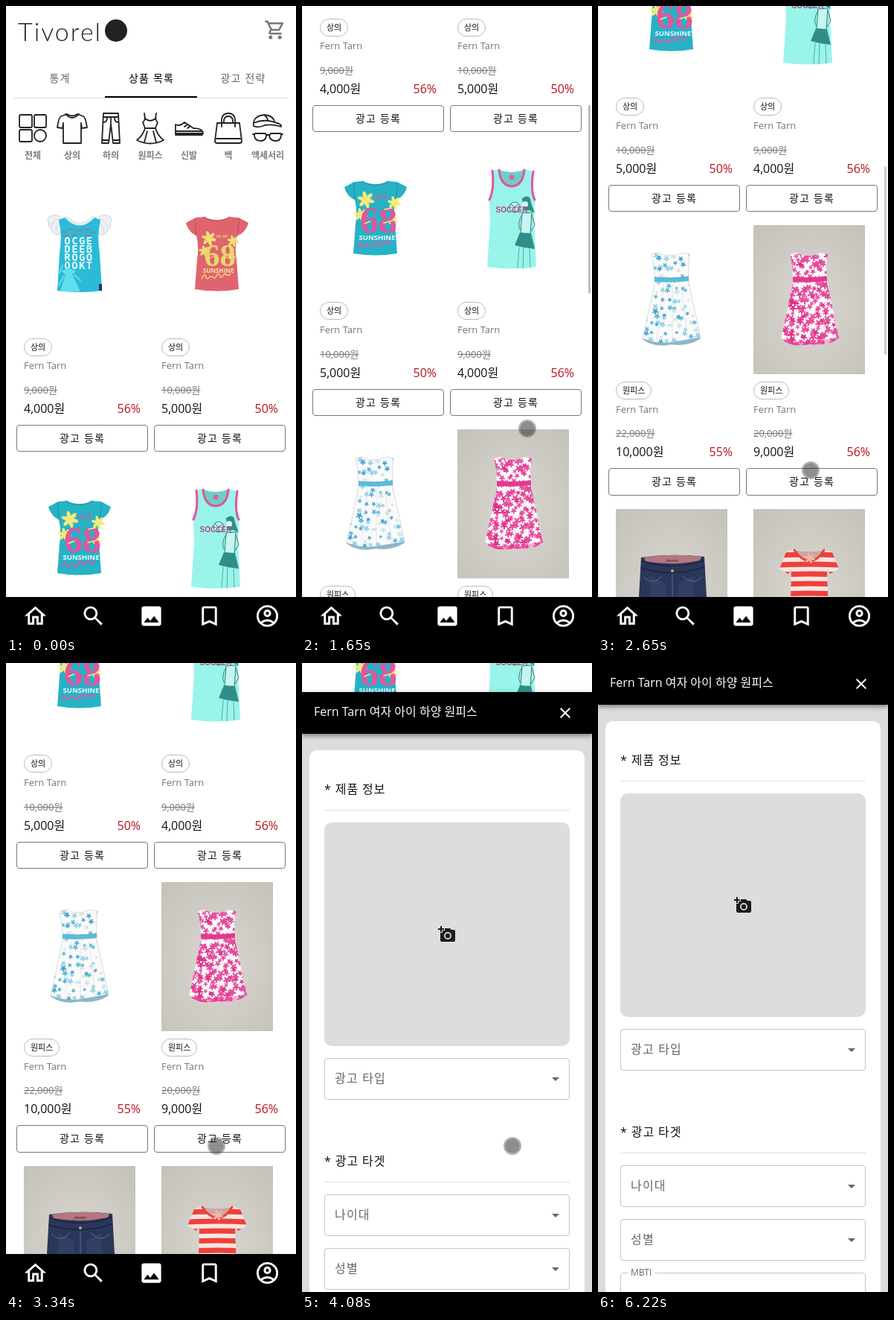
An HTML page for the animation above (8000 ms loop, 390 by 844 pixels).

```html
<!DOCTYPE html>
<html lang="ko">
<head>
<meta charset="utf-8">
<title>상품 목록</title>
<style>
html, body { margin: 0; width: 100%; height: 100%; overflow: hidden; background: #fff; }
body { font: 16px/20px "Open Sans", "Noto Sans CJK KR", "Noto Sans CJK", sans-serif; color: #111; }
div, svg { position: absolute; box-sizing: border-box; }
svg { overflow: visible; }
#stage { left: 0; top: 0; width: 390px; height: 844px; overflow: hidden; }
#page { left: 0; top: 0; width: 390px; height: 1800px; }
.t { white-space: nowrap; line-height: 20px; margin-top: -10px; }
.mid { transform: translateX(-50%); }
.logo { font: 300 34px/20px Lato, "Open Sans", sans-serif; letter-spacing: 2px; color: #222; }
.tab { font-size: 14px; letter-spacing: 1.2px; color: #666; }
.on { color: #000; }
.cat { font-size: 12px; font-weight: 700; color: #7c7c7c; }
.tag { left: 10px; top: 209.8px; height: 24px; padding: 0 8px; border: 1px solid #bbb; border-radius: 12px; font-size: 11px; line-height: 21px; white-space: nowrap; }
.name { font-size: 13px; color: #777; }
.old { font-size: 13px; color: #777; text-decoration: line-through; }
.off { right: 10px; color: #b8101c; }
.btn { left: 0; top: 326px; width: 177px; height: 36.5px; border: 1px solid #777; border-radius: 4px; text-align: center; font-size: 14px; line-height: 33px; letter-spacing: 1.2px; }
.card { width: 177px; height: 380px; }
.pic { left: 10px; top: 0; width: 150px; height: 200px; }
#nav { left: 0; top: 793px; width: 390px; height: 51px; background: #000; }
#bar { left: 385px; top: 4px; width: 3px; height: 253px; border-radius: 2px; background: #bdbdbd; }
#modal { left: 0; top: 0; width: 390px; height: 844px; background: #dcdcde; }
.head { left: 0; top: 0; width: 390px; height: 56px; background: #000; color: #fff; box-shadow: 0 2px 4px -1px #0003, 0 4px 5px #0003, 0 1px 10px #0002; }
.title { font-weight: 500; }
.sheet { left: 10px; top: 78px; width: 370px; height: 900px; border-radius: 10px; background: #fff; }
.photo { left: 30px; width: 330px; height: 300px; border-radius: 10px; background: #ddd; }
.rule { left: 30px; width: 330px; height: 1px; background: #e0e0e0; }
.field { left: 30px; width: 330px; height: 56px; border: 1px solid #c4c4c4; border-radius: 4px; }
.sec { letter-spacing: .9px; }
.lab { letter-spacing: 1.2px; color: #666; }
.notch { padding: 0 4px; font-size: 12px; color: #666; background: #fff; }
#dot { left: -12px; top: -12px; width: 24px; height: 24px; border-radius: 50%; border: 2px solid rgba(90,80,80,.45); background-clip: padding-box; }
</style>
</head>
<body>
<div id="stage">
  <div id="page"></div>
  <div id="bar"></div>
  <div id="nav"></div>
  <div id="modal"></div>
  <div id="dot"></div>
</div>
<script>
const $ = id => document.getElementById(id);
const text = (x, y, s, cls = '') => `<div class="t ${cls}" style="left:${x}px;top:${y}px">${s}</div>`;
const box = (cls, y) => `<div class="${cls}" style="top:${y}px"></div>`;
const icon = (cx, cy, size, color, d) =>
  `<svg viewBox="0 0 24 24" width="${size}" height="${size}" style="left:${cx - size / 2}px;top:${cy - size / 2}px" fill="${color}">${d}</svg>`;
const path = (d, attrs = '') => `<path d="${d}" ${attrs}/>`;
const line = (d, color, w = 1) => path(d, `fill="none" stroke="${color}" stroke-width="${w}" stroke-linecap="round" stroke-linejoin="round"`);
const disc = (x, y, r, attrs = '') => `<circle cx="${x}" cy="${y}" r="${r}" ${attrs}/>`;
const word = (x, y, size, color, s, attrs = '') =>
  `<text x="${x}" y="${y}" font-size="${size}" fill="${color}" font-weight="700" text-anchor="middle" ${attrs}>${s}</text>`;

let seed = 90210;
const rnd = () => (seed = (seed * 16807) % 2147483647) / 2147483647;

/* ---- clothes, each drawn in a 150 x 200 box ---- */
const backdrop = '<rect width="150" height="200" fill="url(#wall)"/>';
const script = (y, color) => line(`M51 ${y + 2}q4 -9 6 -3t5 2t6 -1t5 0q4 -9 6 -3t5 1t6 -2t6 -1`, color, 1.8);
const bloom = (x, y, s, color, petals = 6) => {
  let out = '';
  for (let i = 0; i < petals; i++) out += `<ellipse cx="6" rx="7" ry="3" transform="rotate(${i * 360 / petals + 15})"/>`;
  return `<g transform="translate(${x.toFixed(1)} ${y.toFixed(1)}) scale(${s.toFixed(2)})" fill="${color}">${out}</g>`;
};

function ruffleTee() {
  const sleeve = path('M48 46Q40 43 34 47Q30 50 34 55Q32 60 37 63Q38 70 44 71Q49 72 50 66Z', 'fill="#eef1f4" stroke="#c8d0d8"') +
    line('M46 50Q40 52 37 60M48 54Q43 60 43 68', '#cfd6de');
  const rows = ['OCGE', 'DEEB', 'ROGO', 'OOKT'].map((s, i) =>
    word(74, 84 + i * 11, 14, '#e4fbfe', s, 'font-family="DejaVu Sans Mono, monospace" letter-spacing="1.4"')).join('');
  return sleeve + `<g transform="matrix(-1 0 0 1 150 0)">${sleeve}</g>` +
    path('M57 47Q75 64 93 47L103 51Q98 72 102 96L105 146Q75 150 45 146L48 96Q52 72 47 51Z', 'fill="#2bbad7"') +
    line('M57 47Q75 66 93 47', '#e6ebef', 4) +
    line('M52 67h5m3 -3h7m4 1h8m3 -1h7m3 4h4M54 73h6m5 -1h5m13 0h6', '#8d7f96', 2) + rows +
    path('M49 147L56 124L50 120L60 115L70 120L65 124L76 147Z', 'fill="#62deee"') +
    line('M54 126L47 138M68 125L76 132M52 112L48 122', '#62deee', 2) +
    '<rect x="101" y="137" width="4" height="9" fill="#1c3d4c"/>';
}

function printTee(body, shade, num, accent, white, k) {
  return path('M57 47Q75 55 92 47L104 48L117 55Q115 64 107 70L102 72Q98 88 101 104L104 144Q75 149 45 144L48 104Q51 88 47 72L43 70Q35 64 33 55L46 48Z', `fill="${body}"`) +
    line('M57 47Q75 58 92 47M47 72L45 50M102 72L105 50', shade, 1.2) +
    `<g transform="translate(${75 - 75 * k} ${98 - 98 * k}) scale(${k})">` +
    bloom(62, 72, .9, accent) + bloom(55, 92, .7, accent) + bloom(100, 76, .7, accent) + bloom(98, 100, .5, accent) +
    word(82, 71, 8, num, '68 68', 'font-family="Liberation Serif, serif" font-style="italic"') +
    word(79, 116, 50, num, '68', 'font-family="Liberation Serif, serif"') +
    line('M60 104l8 -3m18 2l12 -3m-11 -15l10 -2', accent, 1.4) +
    word(77, 126, 9.5, white, 'SUNSHINE') + script(133, num) + '</g>';
}

function tank() {
  const trim = '#e2559c', teal = '#2f8f88';
  return path('M47 33L56 31Q58 53 73 54Q88 53 90 31L102 34Q98 58 104 72L103 102L106 162Q73 167 40 162L44 102L43 72Q50 58 47 33Z', 'fill="#99f4e9"') +
    path('M57 32Q73 38 89 32Q87 52 73 53Q59 52 57 32Z', 'fill="#6fcfc6"') +
    line('M56 32Q58 53 73 54Q88 53 90 32M47 33Q50 58 43 72M102 34Q98 60 104 72', trim, 3) +
    disc(73, 42, 3.5, 'fill="#d9679f"') +
    disc(77, 82, 7, 'fill="#b9f5ef" stroke="#397f7c"') + line('M72 78l5 4l5 -4m-5 4v6', '#397f7c') +
    path('M87 70Q98 63 99 76L104 90L97 86Q89 88 88 80Z', `fill="${teal}"`) +
    disc(91, 78, 4, 'fill="#d9f7f2"') +
    path('M87 90L100 89L98 118L85 117Z', 'fill="#c6f6ef" stroke="#397f7c"') +
    line('M87 92Q80 104 84 112M100 92L104 106L99 114', '#397f7c') +
    path('M84 116L99 117L104 138Q90 137 77 133Z', `fill="${teal}"`) +
    line('M83 136L81 163M89 137L88 164M97 138L98 163', '#5aa9a3') +
    word(73, 89, 10, '#b34b86', 'SOCCER', 'font-family="Liberation Sans, sans-serif"');
}

// flowers on a loose grid keep the print even
function dress(id, gap, size, colors, sash, hem) {
  const shape = 'M48 39L57 37Q73 45 89 37L99 39Q96 55 98 70L98 78Q106 112 114 152Q98 163 75 160Q52 165 36 153Q45 112 52 78L52 70Q52 55 48 39Z';
  let spots = '';
  for (let y = 38; y < 166; y += gap)
    for (let x = 36; x < 116; x += gap)
      spots += bloom(x + rnd() * gap, y + rnd() * gap, size * (.6 + rnd() * .6), colors[Math.floor(rnd() * colors.length)], 5);
  return `<clipPath id="${id}">${path(shape)}</clipPath>` + path(shape, 'fill="#fbfafa" stroke="#d9dcde"') +
    `<g clip-path="url(#${id})">${spots}` +
    path('M36 152Q56 160 75 157T115 150V166H36Z', `fill="${hem}"`) +
    path('M50 69Q75 72 100 68V75Q75 78 50 76Z', `fill="${sash}"`) +
    line('M64 80Q60 120 55 156M76 80V158M88 80Q92 120 97 156', '#b9a9b433', 1.5) + '</g>';
}

function jeans() {
  return backdrop + path('M34 65Q76 59 119 64L122 118L128 200H24L31 118Z', 'fill="#2b3759"') +
    path('M47 90L42 200H66L68 100ZM104 90L110 200H86L84 100Z', 'fill="#3a4b78" opacity=".5"') +
    path('M38 65Q76 59 115 64L113 69Q76 77 40 70Z', 'fill="#b4777f"') +
    line('M35 70Q76 83 118 69M34 79Q76 92 119 78', '#1b2441', 1.4) +
    line('M76 88V118Q72 122 70 118M38 92Q50 104 62 90M90 90Q104 104 116 91', '#5d6c94') +
    disc(76, 83, 2, 'fill="#c9a46a"') + word(76, 71, 5, '#5d3b44', 'denim');
}

function stripeTee() {
  const shape = 'M54 54Q75 61 96 54L106 58L115 80L103 87L99 80L102 165H49L51 80L47 87L35 80L44 58Z';
  let bands = '';
  for (let y = 60; y < 165; y += 13) bands += line(`M34 ${y + 2}Q75 ${y} 116 ${y + 2}`, '#ec413c', 7);
  return backdrop + `<clipPath id="st">${path(shape)}</clipPath>` + path(shape, 'fill="#f6e6e2"') +
    `<g clip-path="url(#st)">${bands}</g>` +
    path('M56 55Q75 60 94 55Q86 69 76 70Q64 69 56 55Z', 'fill="#c9a7a0"') +
    line('M55 55Q64 69 76 70Q87 69 95 55', '#ec413c', 3) + bloom(76, 66, .55, '#f3b3ab');
}

const art = [
  ruffleTee(),
  printTee('#df6470', '#c4525f', '#e8d86a', '#f2df72', '#f6e7a0', .85),
  printTee('#27b2c6', '#1f99ab', '#e3559f', '#f3ea7c', '#eafcff', 1),
  tank(),
  dress('d1', 9.5, .3, ['#52b4d8', '#8fd0e6', '#3f9fca', '#cfe3e6'], '#5cbbd6', '#8db6c4'),
  backdrop + `<g transform="translate(1 0)">${dress('d2', 7, .36, ['#e8459b', '#dd2f88', '#e6509f'], '#e23a90', '#e8459b66')}</g>`,
  jeans(), stripeTee()
];
const goods = [
  ['상의', '9,000', '4,000', 56], ['상의', '10,000', '5,000', 50],
  ['상의', '10,000', '5,000', 50], ['상의', '9,000', '4,000', 56],
  ['원피스', '22,000', '10,000', 55], ['원피스', '20,000', '9,000', 56],
  ['하의', '18,000', '9,000', 50], ['상의', '9,000', '4,000', 56]
];
const cards = goods.map(([kind, old, now, off], i) =>
  `<div class="card" style="left:${14 + i % 2 * 185}px;top:${235.9 + (i >> 1) * 380.6}px">
  <svg class="pic" viewBox="0 0 150 200">${art[i]}</svg><div class="tag">${kind}</div>` +
  text(10, 246.6, 'Fern Tarn', 'name') + text(10, 279, old + '원', 'old') + text(10, 304, now + '원') +
  `<div class="t off" style="top:304px">${off}%</div><div class="btn">광고 등록</div></div>`).join('');

/* ---- list page ---- */
const cats = [['전체', 36], ['상의', 89], ['하의', 141], ['원피스', 194], ['신발', 246], ['백', 299], ['액세서리', 352]];
const sketches = [
  'M20 146h13q2 0 2 2v13q0 2 -2 2h-13q-2 0 -2 -2v-13q0 -2 2 -2zM40 146h12q2 0 2 2v13q0 2 -2 2h-12q-2 0 -2 -2v-13q0 -2 2 -2zM20 166h13q2 0 2 2v12q0 2 -2 2h-13q-2 0 -2 -2v-12q0 -2 2 -2zM54 174a8 8 0 1 1 -16 0a8 8 0 1 1 16 0z',
  'M82 145Q89 150 96 145L104 148Q107 149 109 163L102 164L101 157V184H77V157L76 164L69 163Q71 149 74 148ZM80 145Q89 155 98 145',
  'M131 144H151L153 184H144L141 158L138 184H129ZM131 149H151M141 149V158M131 156Q136 156 136 150M151 156Q146 156 146 150M129 180H138M144 180H153',
  'M186 144L187 151Q194 157 201 151L202 144M186 144Q188 154 184 156L187 164H201L204 156Q200 154 202 144M187 164Q184 174 176 180Q194 189 212 180Q204 174 201 164M190 168L186 183M198 168L202 183',
  'M228 159Q234 162 240 156L252 164Q265 164 265 171H228ZM228 168H264M228 171V173H264M240 162l4 -3m0 5l4 -3',
  'M284 157H314L317 181Q317 184 314 184H284Q281 184 281 181ZM290 162V152Q291 144 299 144T308 152V162M293 157V153Q294 148 299 148T305 153V157M283 178H315',
  'M333 161Q331 148 347 146Q360 147 361 156Q371 158 370 162Q360 158 348 160Q338 164 333 161ZM333 157Q347 151 361 156M347 146Q352 150 352 154M335 171H348Q350 171 350 174Q349 181 343 181Q334 181 334 173ZM356 171H369Q370 171 370 174Q369 181 363 181Q355 181 354 174ZM350 173H354M332 172H334M370 172H372'
];
const cart = 'M15.55 13c.75 0 1.41-.41 1.75-1.03l3.58-6.49c.37-.66-.11-1.48-.87-1.48H5.21l-.94-2H1v2h2l3.6 7.59-1.35 2.44C4.52 15.37 5.48 17 7 17h12v-2H7l1.1-2h7.45zM6.16 6h12.15l-2.76 5H8.53L6.16 6z';
$('page').innerHTML =
  `<svg width="0" height="0"><radialGradient id="wall" cx=".5" cy=".55" r=".75"><stop offset="0" stop-color="#d9d7d0"/><stop offset="1" stop-color="#c4c1b9"/></radialGradient></svg>` +
  text(16, 34, 'Tivorel', 'logo') +
  `<svg width="390" height="220" style="left:0;top:0">${disc(148, 33, 15, 'fill="#222"')}
  <path d="M10 123.5H380" stroke="#ddd"/><path d="M133 122H257" stroke="#000" stroke-width="2"/>
  ${sketches.map(d => line(d, '#222', 1.8)).join('')}</svg>` +
  icon(362, 31.5, 30, '#777', path(cart) + disc(7, 20, 2) + disc(17, 20, 2)) +
  text(72.5, 97, '통계', 'tab mid') + text(195.5, 97, '상품 목록', 'tab mid on') + text(319, 97, '광고 전략', 'tab mid') +
  cats.map(([s, x]) => text(x, 201, s, 'cat mid')).join('') + cards;

/* ---- bottom bar ---- */
const navIcons = [
  path('M12 5.69l5 4.5V18h-2v-6H9v6H7v-7.81l5-4.5M12 3L2 12h3v8h6v-6h2v6h6v-8h3L12 3z'),
  disc(9.5, 9.5, 5.5, 'fill="none" stroke="#fff" stroke-width="2"') + path('M14 12.8L20.5 19L19 20.5L12.8 14Z'),
  path('M21 19V5c0-1.1-.9-2-2-2H5c-1.1 0-2 .9-2 2v14c0 1.1.9 2 2 2h14c1.1 0 2-.9 2-2zM8.5 13.5l2.5 3.01L14.5 12l4.5 6H5l3.5-4.5z'),
  path('M17 3H7c-1.1 0-1.99.9-1.99 2L5 21l7-3 7 3V5c0-1.1-.9-2-2-2zm0 15l-5-2.18L7 18V5h10v13z'),
  `<g fill="none" stroke="#fff" stroke-width="2">${disc(12, 12, 9)}${disc(12, 9.5, 2.5)}<path d="M6 18.3Q12 13.7 18 18.3"/></g>`
];
$('nav').innerHTML = navIcons.map((d, i) => icon(39 + i * 78, 25, 35, '#fff', d)).join('');

/* ---- sheet ---- */
const camera = 'M3 4V1h2v3h3v2H5v3H3V6H0V4h3zm3 6V7h3V4h7l1.83 2H21c1.1 0 2 .9 2 2v12c0 1.1-.9 2-2 2H5c-1.1 0-2-.9-2-2V10h3z';
const cross = 'M19 6.41 17.59 5 12 10.59 6.41 5 5 6.41 10.59 12 5 17.59 6.41 19 12 13.41 17.59 19 19 17.59 13.41 12z';
const select = (y, s) => box('field', y) + text(44, y + 27, s, 'lab') + icon(341, y + 28, 24, '#666', path('M7 10l5 5 5-5z'));
$('modal').innerHTML = box('sheet', 78) + text(30, 130, '* 제품 정보', 'sec') + box('rule', 158) + box('photo', 175) +
  icon(195, 325, 24, '#1c1c1c', path(camera) + disc(13, 14, 4.1, 'fill="none" stroke="#ddd" stroke-width="1.8"')) +
  select(491, '광고 타입') + text(30, 629, '* 광고 타겟', 'sec') + box('rule', 657) +
  select(674, '나이대') + select(746, '성별') + box('field', 818) + text(40, 818, 'MBTI', 'notch') +
  `<div class="head">${text(16, 26, 'Fern Tarn 여자 아이 하양 원피스', 'title')}${icon(354, 28, 24, '#fff', path(cross))}</div>`;

/* ---- motion ---- */
const ticks = [0, 930, 990, 1050, 1450, 1510, 1580, 1650, 1710, 1780, 2050, 2120, 2190, 2250, 2650, 2720, 2790, 2860, 2920,
  3070, 3140, 3210, 3270, 3340, 3680, 3870, 3940, 4010, 4080, 4140, 4210, 4740, 4820, 4880, 4950, 5220, 5420, 5680, 5750,
  5890, 5970, 6050, 6140, 6220];
// time, x, y
const trail = [[930, 358, 761], [1050, 303, 567], [2580, 303, 567], [2650, 286, 623], [2920, 268, 669], [3000, 268, 669],
  [3340, 283, 648], [4670, 283, 648], [4740, 283, 541], [4950, 250, 342], [5610, 250, 342], [5750, 261, 349],
  [5820, 261, 349], [6140, 271, 346], [6220, 271, 346]];
const part = (t, a, b) => Math.min(1, Math.max(0, (t - a) / (b - a)));
const glide = (t, a, b) => 1 - (1 - part(t, a, b)) ** 2.25;

// cubic-bezier(0, 0, .2, 1)
function decel(x) {
  let lo = 0, hi = 1;
  for (let i = 0; i < 24; i++) {
    const s = (lo + hi) / 2;
    if (.6 * s * s + .4 * s ** 3 < x) lo = s; else hi = s;
  }
  return 3 * lo * lo - 2 * lo ** 3;
}

function draw(now) {
  const clock = now % 8000;
  const t = ticks.filter(k => k <= clock).pop();

  const y = Math.round(469 * glide(t, 1392, 1780) + 234 * glide(t, 2016, 2250));
  $('page').style.transform = `translateY(${-y}px)`;
  $('bar').style.transform = `translateY(${.3 * y}px)`;
  $('bar').style.opacity = t < 1450 ? 0 : 1 - part(t, 2580, 2920);

  const top = Math.round(844 * (1 - decel(part(t, 3918.8, 4143.8))));
  $('modal').style.transform = `translateY(${top}px)`;
  $('modal').style.visibility = t < 3920 ? 'hidden' : 'visible';

  const dot = $('dot').style;
  dot.visibility = t < 930 || t >= 6220 ? 'hidden' : 'visible';
  const i = Math.max(0, trail.findLastIndex(k => k[0] <= t));
  const a = trail[i], b = trail[i + 1] || a;
  const p = a === b ? 0 : part(t, a[0], b[0]);
  dot.transform = `translate(${a[1] + (b[1] - a[1]) * p}px, ${a[2] + (b[2] - a[2]) * p}px)`;
  const down = t >= 3680 && t < 3870 || t >= 5220 && t < 5420;
  dot.backgroundColor = `rgba(30,30,30,${down ? .62 : .5})`;
}
function loop() {
  draw(performance.now());
  requestAnimationFrame(loop);
}
loop();
</script>
</body>
</html>
```
